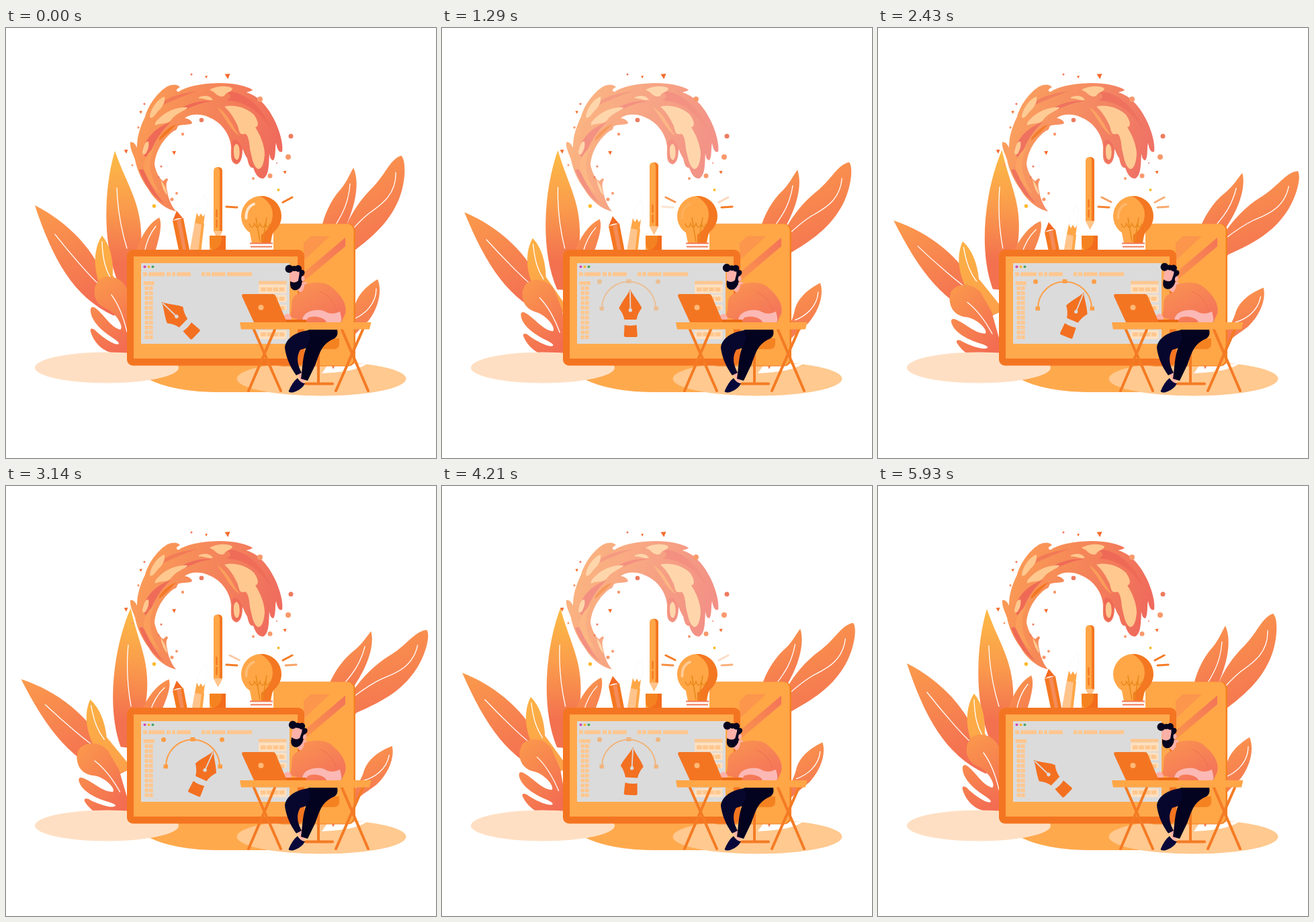
These frames come from a looping animation (640x640 px, 6000 ms). An HTML page:

```html
<!DOCTYPE html>
<html lang="en">
<head>
<meta charset="utf-8">
<title>Designer at work</title>
<style>
html, body { margin: 0; width: 100%; height: 100%; overflow: hidden; background: #fff; }
svg { display: block; width: 100vw; height: 100vh; }
.vein { fill: none; stroke: #fff; stroke-width: 1.3; stroke-linecap: round; }
.line { fill: none; stroke: #f47b24; stroke-width: 4; stroke-linecap: round; }
</style>
</head>
<body>
<svg viewBox="0 0 640 640">
  <defs>
    <linearGradient id="leaf" x1="0" y1="0" x2=".3" y2="1">
      <stop offset="0" stop-color="#fb9b4c"/><stop offset="1" stop-color="#f36d52"/>
    </linearGradient>
    <linearGradient id="tall" x1="0" y1="0" x2="0" y2="1">
      <stop offset="0" stop-color="#fdbb45"/><stop offset=".4" stop-color="#fa9c4c"/><stop offset=".8" stop-color="#f3714f"/>
    </linearGradient>
    <linearGradient id="gold" x1="0" y1="0" x2="0" y2="1">
      <stop offset="0" stop-color="#fdb145"/><stop offset="1" stop-color="#fca04a"/>
    </linearGradient>
    <linearGradient id="wave" gradientUnits="userSpaceOnUse" x1="205" y1="120" x2="400" y2="190">
      <stop offset="0" stop-color="#fa9a55"/><stop offset=".45" stop-color="#f58559"/><stop offset="1" stop-color="#ef6a5c"/>
    </linearGradient>
    <linearGradient id="stripe" x1="0" y1="1" x2="1" y2="0">
      <stop offset="0" stop-color="#fb954c"/><stop offset="1" stop-color="#f37358"/>
    </linearGradient>
    <linearGradient id="shirt" x1="0" y1="0" x2=".7" y2="1">
      <stop offset="0" stop-color="#fa9450"/><stop offset="1" stop-color="#f4745a"/>
    </linearGradient>
    <linearGradient id="ray" x1="0" y1="0" x2="1" y2="0">
      <stop offset="0" stop-color="#f47721"/><stop offset="1" stop-color="#f47721"/>
    </linearGradient>
  </defs>

  <g id="leaves"></g>

  <g id="splash">
    <path fill="url(#wave)" d="M253 273C236 269 221 256 212 240C201 225 195 211 192 196C189 187 184 179 185 170C190 169 193 174 195 178C195 160 200 147 207 132C212 113 228 94 240 87C248 83 256 84 259 88C253 91 252 94 257 95C270 86 294 82 320 82C338 82 358 86 367 92C365 95 360 94 358 96C376 101 390 118 399 136C407 152 413 172 411 184C406 187 403 178 402 171C400 180 402 191 398 197C393 196 393 191 392 187C391 202 392 219 383 224C374 224 371 216 368 208C363 209 361 203 359 194C356 190 354 184 352 180C352 192 350 201 343 203C333 201 335 188 335 177C334 160 322 140 300 132C288 127 274 128 266 134C272 135 277 138 277 142C270 145 262 143 256 146C254 149 255 152 250 153C236 163 223 181 221 203C223 214 228 224 234 228C237 225 240 222 241 226C238 230 238 235 240 243C242 256 247 266 253 273Z"/>
    <g fill="#ef6a56">
      <path d="M238 139C254 118 283 106 307 109C288 111 263 121 238 139Z"/>
      <path d="M320 94C355 91 382 118 395 151C376 122 355 109 328 108C340 102 333 96 320 94Z"/>
      <path d="M203 181C212 158 225 148 245 140C230 154 220 171 213 190Q207 199 203 181Z"/>
      <path d="M203 210C211 220 217 242 235 261C221 253 208 237 198 211Z"/>
      <path d="M336 170Q343 160 351 177C352 195 346 203 341 201C335 196 338 182 336 170Z"/>
      <path d="M220 121C236 103 260 97 285 94C260 102 242 111 220 121Z" opacity=".6"/>
    </g>
    <g fill="#fb9d5a">
      <path d="M228 164Q238 149 254 143Q242 156 228 168Z" fill="#f47721"/>
      <path d="M314 118C330 125 339 151 348 160C338 157 329 138 314 118Z"/>
      <path d="M205 208Q204 190 222 177Q212 194 215 213Q219 231 230 247Q211 232 205 208Z"/>
    </g>
    <g fill="#ffc88e">
      <path d="M303 92C313 86 331 85 337 90C336 96 327 95 325 101C318 104 313 99 309 95Z"/>
      <path d="M287 103C296 99 305 101 308 107C300 109 294 104 287 105Z"/>
      <path d="M325 117C339 113 358 118 369 129C377 140 376 147 371 148C378 158 385 175 385 188C384 201 381 210 375 210C368 206 366 193 363 180C362 166 359 155 354 158C345 159 348 150 343 142C338 132 333 124 325 117Z"/>
      <path d="M236 102C227 105 216 118 214 132C216 138 223 128 227 123C234 117 237 109 236 102Z"/>
      <path d="M222 141C233 126 252 117 270 118C268 123 257 125 248 134C241 145 234 140 222 145Z"/>
      <path d="M203 184Q206 168 212 169Q214 177 208 187Q203 191 203 184Z"/>
      <path d="M339 178Q343 167 347 178Q349 190 345 196Q338 198 339 178Z"/>
      <path d="M230 226Q239 236 240 249Q233 242 230 226Z"/>
    </g>
  </g>
  <g id="drops"></g>

  <ellipse cx="315" cy="502" rx="120" ry="40" fill="#ffa94d"/>
  <path d="M310 542H390V515H310Z" fill="#ffa94d"/>
  <ellipse cx="150" cy="505.500" rx="107" ry="23" fill="#ffdfc3"/>
  <ellipse cx="469.500" cy="522" rx="126" ry="25.500" fill="#ffc98f"/>
  <path d="M480 500L537 500Q520 512 470 514Z" fill="#fff"/>
  <path d="M485 503H489L487 508Z" fill="#f3714f"/>

  <rect x="400" y="291.500" width="120" height="212" rx="11" fill="#f58022"/>
  <rect x="398" y="291.500" width="119.500" height="211" rx="10" fill="#ffa647"/>
  <path d="M454 310H482L443 346V320Z" fill="#fb964c"/>
  <path d="M505 312V325L441 379V366Z" fill="url(#stripe)"/>

  <g id="pencil">
    <path d="M248 287L264 283L274 335H258Z" fill="#f47721"/>
    <path d="M254 286L260 284L269 335H264Z" fill="#f58b58"/>
    <path d="M254 272L248 287Q256 281 264 284Z" fill="#f36a22"/>
  </g>
  <g id="brush">
    <path d="M285 276C284 262 290 258 297 247C300 260 298 270 296 278Z" fill="#fff" stroke="#eee" stroke-width=".7" stroke-dasharray="2 2"/>
    <path d="M281 289L294 292L289 335H273Z" fill="#ffc48c"/>
    <path d="M291 291L295 291L290 335H286Z" fill="#ffa647"/>
    <path d="M284 275L287 281L290 276L293 281L296 277L294 293L281 290Z" fill="#ffa647"/>
  </g>
  <g id="pen">
    <path d="M309 213Q309 207 315 207Q322 207 322 213V302L315.500 315L309 302Z" fill="#ffa647"/>
    <path d="M315 207Q322 207 322 213V302L318 310V213Q318 209 315 207Z" fill="#f47721"/>
    <path d="M309 302H322L315.500 315Z" fill="#ffc48c"/>
    <path d="M313.500 271V281M313.500 286V296" class="line" stroke-width="2" style="stroke-width:2.500"/>
  </g>
  <path d="M303 309H327V331H303Z" fill="#ffa647"/>
  <path d="M303 309H327V320Q326 331 315 331H309Q303 329 303 318Z" fill="#f58220"/>
  <path d="M327 309V331H305Q322 329 321 309Z" fill="#f36c1c"/>

  <g id="bulb">
    <path d="M363 305H397L394 320H366Z" fill="#ffa647"/>
    <circle cx="380" cy="280" r="30" fill="#ffa647"/>
    <path d="M378 250A30 30 0 0 1 399 303Q394 309 394 320H380V308Q396 296 397 278Q397 260 378 250Z" fill="#f47721"/>
    <path d="M362 291Q366 302 370 291Q374 302 378 291Q382 302 386 291Q390 302 393 291M372 282L378 318M388 282L382 318" fill="none" stroke="#e98a1c" stroke-width="1.600"/>
    <path id="shine" d="M357.500 283C357 272 362 265 369 262" fill="none" stroke="#ffeedd" stroke-width="4" stroke-linecap="round"/>
    <path d="M363 320.500H397M364 325.500H396" fill="none" stroke="#f27a56" stroke-width="2.200"/>
  </g>
  <g id="rays" class="line" style="stroke-width:3">
    <path d="M412 259.500L426 252"/><path d="M416 267L432 266"/>
    <path d="M347 259L333 252"/><path d="M344 267L328 266"/>
  </g>

  <rect x="180" y="330" width="264" height="172.500" rx="9" fill="#f47521"/>
  <rect x="190" y="340" width="244" height="152" fill="#ffa94d"/>
  <rect x="201" y="350" width="221" height="120" fill="#dbdbdb"/>
  <g id="ui" fill="#ffc78f">
    <circle cx="206.500" cy="355.300" r="1.900" fill="#d43fb4"/>
    <circle cx="212.500" cy="355.300" r="1.900" fill="#f5b52b"/>
    <circle cx="218.500" cy="355.300" r="1.900" fill="#43a660"/>
  </g>
  <g id="curve" fill="#ff9c40">
    <path d="M238 417A40 39.500 0 0 1 318 417" fill="none" stroke="#ff9c40" stroke-width="2"/>
    <circle cx="234.500" cy="377.500" r="3.500"/><circle cx="321.500" cy="377.500" r="3.500"/>
    <path d="M274.500 374h7v6h-7zM234.500 414.500h6.500v6h-6.500zM315.500 414.500h6.500v6h-6.500z"/>
  </g>
  <g id="nib">
    <path d="M0 -62C-4 -53 -12 -45 -17 -34Q-11 -27 -9 -17H9Q11 -27 17 -34C12 -45 4 -53 0 -62Z" fill="#f37021"/>
    <path d="M0 -60V-32" stroke="#dbdbdb" stroke-width="1.800"/>
    <circle cy="-31" r="2.700" fill="#dbdbdb"/>
    <path d="M-9 -9Q0 -7 9 -9L10 7Q10 9 7 9H-7Q-10 9 -10 7Z" fill="#f37021"/>
  </g>

  <path d="M456 462H496V471Q495 478 488 478H462Z" fill="#f58220"/>
  <path class="line" d="M465 476V529M446 529.500H486"/>
  <path d="M434 514L441 512L448 522L440 529Z" fill="#fbb0a8"/>
  <path d="M466 449C435 448 416 461 415 476C417 492 424 506 432 517L440 513C433 500 432 489 438 479L474 468Z" fill="#07072e"/>
  <path d="M450 449H493Q495 458 489 462C471 470 468 480 461 500L449 525L439 522C442 502 441 481 453 463Z" fill="#030320"/>
  <path d="M420.500 541Q426 527 434 521Q438 528 445 529Q441 537 431 541Q424 544 420.500 541Z" fill="#07073a"/>
  <path class="line" d="M369 449L409 540M400 449L361 540M500 449L539 540M531 449L491 540"/>

  <path d="M437 378L447 378L450 388L440 396L434 390Z" fill="#fbb0a8"/>
  <path d="M444 382C458 377 477 378 484 385C500 398 508 412 505 425L499 438H447L422 430C428 418 422 405 430 398C438 393 443 394 444 382Z" fill="url(#shirt)"/>
  <path d="M468 392Q488 402 492 420" fill="none" stroke="#ee7050" stroke-width="1"/>
  <path d="M414 438V428Q421 422 425 431L424 438Z" fill="#fbb0a8"/>
  <path d="M441 433C445 420 462 418 473 421C482 427 491 425 497 422Q501 436 498 438H477C475 431 460 427 450 431Q446 438 441 433Z" fill="#fbb8b4"/>
  <g id="head">
    <path d="M422 361H438L441 382L430 386L423 379Z" fill="#fbb0a8"/>
    <path d="M423 377Q430 381 435 376L437 364H443L440 382Q436 392 428 390Q422 388 423 377Z" fill="#05051f"/>
    <ellipse cx="442" cy="373" rx="2.500" ry="4" fill="#fbb0a8"/>
    <g fill="#05051f">
      <circle cx="421.500" cy="358.500" r="6"/><circle cx="429" cy="358" r="4"/>
      <circle cx="435" cy="358" r="5"/><circle cx="440.500" cy="364" r="4"/>
    </g>
  </g>

  <path d="M400 434H445Q448 434 447 438H400Z" fill="#ec6a14"/>
  <path d="M354 396H397Q400 396 401 398L418 438H369L351.500 400Q350 396 354 396Z" fill="#f47521"/>
  <circle cx="379.500" cy="416" r="4" fill="#ffb978"/>
  <path d="M348 438H543.500L541 448.500H350Z" fill="#ffa647"/>
</svg>
<script>
const LOOP = 6000, STEP = LOOP / 84;
const $ = id => document.getElementById(id);

function add(parent, tag, attrs) {
  const el = document.createElementNS('http://www.w3.org/2000/svg', tag);
  for (const k in attrs) el.setAttribute(k, attrs[k]);
  return parent.appendChild(el);
}

// outline, vein, fill, pivot and swing in degrees
const leaves = [
  ['M43 264C95 290 135 335 148 378L185 420L160 428C100 400 70 345 43 264Z', 'M73 307C95 335 125 370 140 383', 'leaf', '188 412', -8.800],
  ['M162 183C181 238 205 262 201 330L205 390H172C142 330 145 240 162 183Z', 'M165 238C166 272 172 302 180 328', 'tall', '185 378', 7],
  ['M228 282C233 292 229 312 218 345L195 400L185 370C190 335 203 296 228 282Z', 'M223 295C214 306 209 318 206 334', 'leaf', '190 398', 7.500],
  ['M143 309C155 323 160 345 159 368L190 420L165 425C128 380 126 335 143 309Z', 'M143 318C144 345 148 358 155 371', 'gold', '194 433', -8.600],
  ['M138 375C150 365 172 370 180 388L188 420V490L160 484C140 480 130 465 126 452C124 445 131 447 134 451C144 461 164 474 168 470C169 464 140 455 128 430C124 418 126 413 132 416C145 425 155 445 170 449C176 446 165 425 150 418C135 412 129 400 133 384Z', 'M157 397C168 412 175 430 180 452', 'leaf', '186 490', -16.600],
  ['M517 208C525 225 523 255 508 290L490 350H470C460 310 475 265 498 240C508 228 512 216 517 208Z', 'M512 232C510 258 502 275 490 294', 'leaf', '485 358', 10.500],
  ['M588 190C596 196 596 235 580 265C565 295 540 315 515 334L490 385L485 360C500 300 515 270 540 243C565 220 570 196 588 190Z', 'M580 215C581 250 555 265 540 276C525 288 515 300 505 312', 'leaf', '504 364', 13.700],
  ['M553 374C560 390 555 415 540 435C528 448 518 455 510 470L488 508L485 502C500 470 515 440 518 420C520 400 535 385 553 374Z', 'M551 388C551 410 535 425 520 432', 'leaf', '490 503', 10.300]
].map(([outline, vein, fill, pivot, swing]) => {
  const g = add($('leaves'), 'g', {});
  add(g, 'path', { d: outline, fill: `url(#${fill})` });
  add(g, 'path', { d: vein, class: 'vein' });
  return { g, pivot, swing };
});

const dot = (cx, cy, r, fill) => add($('drops'), 'circle', { cx, cy, r, fill });
const tri = (x, y, s) =>
  add($('drops'), 'path', { d: `M${x - s} ${y - s * .8}L${x + s} ${y - s}L${x + s * .2} ${y + s}Z`, fill: '#f36b2c' });

[[378, 106, 4], [420, 192, 4], [393, 220, 3.5], [368, 224, 2], [263, 158, 2.2], [188, 204, 1.5],
 [197, 148, 1.7], [254, 246, 2], [247, 255, 2.6]].forEach(([x, y, r]) => dot(x, y, r, '#f9996c'));
[[424, 161, 3.5], [291, 137, 3.3], [276, 69, 1.5], [206, 113, 1.6], [231, 206, 1.6], [227, 222, 1.5],
 [403, 201, .9]].forEach(([x, y, r]) => dot(x, y, r, '#ee7a5e'));
dot(220.5, 265, 2.7, '#fdb92b');
dot(405.5, 241, 2, '#fdb92b');
[[329.500, 72, 4], [298, 73, 2], [250, 186, 3], [178.500, 184, 3], [200.500, 125.500, 2.200], [415, 215, 2.600]]
  .forEach(a => tri(...a));

const box = (x, y, width, height, fill) => add($('ui'), 'rect', { x, y, width, height, ...(fill && { fill }) });
[[204, 6], [212, 24], [239, 6], [247, 5], [254, 21], [291, 5.5], [298, 6], [306, 20.5], [329, 37]]
  .forEach(([x, w]) => box(x, 363.5, w, 5.8));
box(204.5, 377, 16.5, 5.5);
for (let i = 0; i < 11; i++) for (const x of [206.5, 213]) box(x, 384.5 + i * 7.3, 5.7, 5.5);
[[382, 13], [397, 11], [412, 8], [450, 13]].forEach(([y, h]) => box(376, y, 41.5, h, '#ffe0c0'));
box(376, 376.5, 41.5, 5);
for (const y of [386, 400, 414, 453]) for (let i = 0; i < 4; i++) box(379 + i * 9.2, y, 7.8, 6);

// smooth curve through [time, value] points
function smooth(keys, t) {
  let i = 0;
  while (i < keys.length - 2 && t >= keys[i + 1][0]) i++;
  const slope = j => {
    const a = keys[j - 1], b = keys[j + 1];
    return a && b ? (b[1] - a[1]) / (b[0] - a[0]) : 0;
  };
  const [t0, v0] = keys[i], [t1, v1] = keys[i + 1], d = t1 - t0, u = (t - t0) / d;
  const s = u * u * (3 - 2 * u);
  return v0 + (v1 - v0) * s + d * u * (1 - u) * ((1 - u) * slope(i) - u * slope(i + 1));
}

const marks = [0, 1290, 1790, 3140, 4210, 4930, 5930, 6000];
function linear(values, t) {
  let i = 0;
  while (i < marks.length - 2 && t >= marks[i + 1]) i++;
  const u = (t - marks[i]) / (marks[i + 1] - marks[i]);
  return values[i] + (values[i + 1] - values[i]) * u;
}

const nibTurn = [[0, -46], [1290, -.5], [1790, 13.6], [2850, 26], [3140, 24.6], [4210, 3], [4930, -24], [5930, -46], [6000, -46]];
const rayGlow = [
  [1, .3, .25, 1, .25, 1, 1, 1],
  [0, 1, .6, .7, .6, .2, 1, 1],
  [0, .8, 1, .4, 1, .3, 0, 0],
  [1, .2, .9, 1, .85, 1, 0, 0]
];
const shineGlow = [.9, .12, .15, .3, .5, .85, 0, 0];
const wave = (t, period) => (1 - Math.cos(2 * Math.PI * (t + 100) / period)) / 2;
const place = (id, value) => $(id).setAttribute('transform', value);

function draw(t) {
  const p = wave(t, LOOP);
  for (const { g, pivot, swing } of leaves) g.setAttribute('transform', `rotate(${swing * p} ${pivot})`);
  $('splash').setAttribute('opacity', 1 - .27 * wave(t, LOOP / 2));
  place('pencil', `translate(0 ${18 * p})`);
  place('brush', `translate(0 ${18 * p})`);
  place('pen', `translate(0 ${-16 * p})`);
  place('head', `rotate(${10 * p} 441 388)`);
  const a = smooth(nibTurn, t);
  place('nib', `translate(${280.8 + a * .1} 451) rotate(${a})`);
  $('curve').setAttribute('opacity', p < .02 ? 0 : p);
  [...$('rays').children].forEach((ray, i) => ray.setAttribute('opacity', linear(rayGlow[i], t)));
  $('shine').setAttribute('opacity', linear(shineGlow, t));
}

const start = performance.now();
function tick() {
  const t = (performance.now() - start) % LOOP;
  draw(Math.floor((t + 5) / STEP) % 84 * STEP);
  requestAnimationFrame(tick);
}
tick();
</script>
</body>
</html>
```
